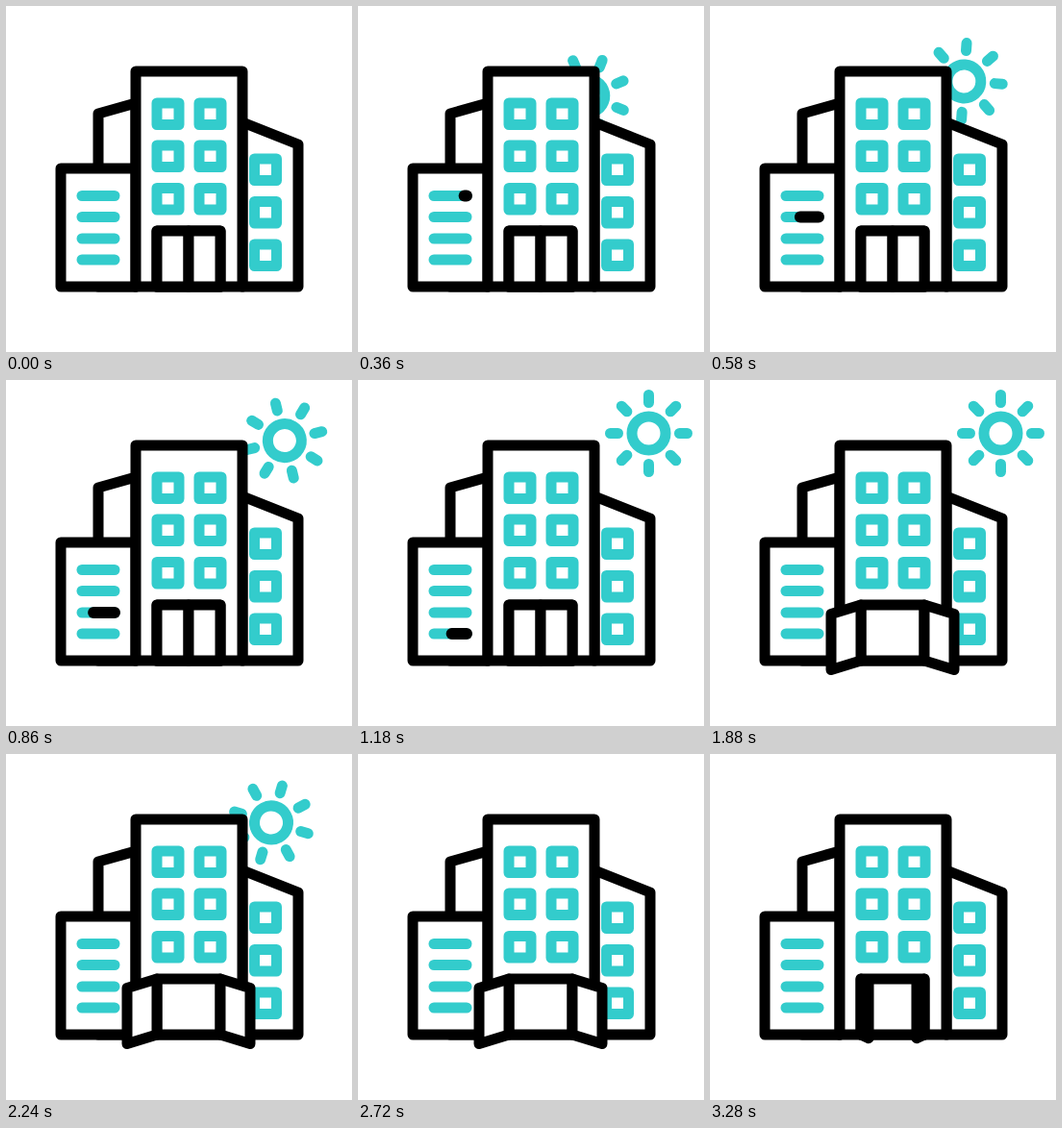
An HTML page that plays this animation: 360x360 px, repeating every 3.3 s.

```html
<!DOCTYPE html>
<html lang="en">
<head>
<meta charset="utf-8">
<title>City building</title>
<style>
  html, body { margin: 0; width: 100%; height: 100%; overflow: hidden; background: #fff; }
  svg { display: block; width: 100vw; height: 100vh; }
  .ink { fill: #fff; stroke: #000; }
  .teal { fill: none; stroke: #3cc; }
  .mark { fill: none; stroke: #000; stroke-width: 12; }
</style>
</head>
<body>
<svg viewBox="0 0 360 360" stroke-width="11" stroke-linecap="round" stroke-linejoin="round">
  <g id="sun" class="teal"><circle r="17.5"/></g>
  <path class="ink" d="M96 292V112L135 101V292Z"/>
  <path class="ink" d="M246 121L304 144V292H246Z"/>
  <g id="side" class="teal"></g>
  <path class="ink" d="M57 169H135V292H57Z"/>
  <g id="lines"></g>
  <path class="ink" d="M135 68H246V292H135Z"/>
  <g id="front" class="teal"></g>
  <path class="ink" d="M157 234H223V292H157Z"/>
  <path id="left" class="ink"/>
  <path id="right" class="ink"/>
</svg>
<script>
const LOOP = 3300;
const $ = id => document.getElementById(id);

function add(parent, tag, attrs) {
  const el = document.createElementNS('http://www.w3.org/2000/svg', tag);
  for (const k in attrs) el.setAttribute(k, attrs[k]);
  return parent.appendChild(el);
}

const pane = (parent, x, y) => add(parent, 'rect', { x, y, width: 23, height: 22.5 });

for (let a = 0; a < 360; a += 45)
  add($('sun'), 'path', { d: 'M0 -32V-40', transform: `rotate(${a})` });

for (const y of [101, 145, 189.5]) {
  pane($('front'), 157, y);
  pane($('front'), 201, y);
}
for (const y of [159, 203.5, 248]) pane($('side'), 258.5, y);

const marks = [197.5, 219.5, 242, 264].map(y => {
  add($('lines'), 'path', { class: 'teal', d: `M79 ${y}H113` });
  return { y, el: add($('lines'), 'path', { class: 'mark' }) };
});

const clamp = v => Math.min(1, Math.max(0, v));
const part = (t, start, length) => clamp((t - start) / length);
const smooth = u => u * u * (3 - 2 * u);

// 0 = high in the sky, 1 = hidden behind the tower
function moveSun(t) {
  const q = t < 1500
    ? Math.pow(1 - part(t, 0, 1100), 1.43)
    : Math.pow(part(t, 2010, 762), 1.2);
  $('sun').setAttribute('transform',
    `translate(${302.5 - 111.5 * q} ${55.5 + 67 * q}) rotate(${-120 * q})`);
}

// A dark stroke grows along each line, then leaves at the right end
function moveMarks(t) {
  marks.forEach(({ y, el }, i) => {
    const u = part(t, 78 + 292 * i, 292);
    const from = 79 + 34 * clamp(2 * u - 1);
    const to = 79 + 34 * clamp(2 * u);
    el.setAttribute('d', to > from ? `M${from} ${y}H${to}` : '');
  });
}

function moveDoors(t) {
  const open = smooth(part(t, 1220, 640)) - smooth(part(t, 2930, 610));
  const dx = 33 - 64 * open;
  const dy = 9.5 * open;
  const leaf = (hinge, x) =>
    `M${hinge} 234L${x} ${234 + dy}V${292 + dy}L${hinge} 292Z`;
  $('left').setAttribute('d', leaf(157, 157 + dx));
  $('right').setAttribute('d', leaf(223, 223 - dx));
}

function draw(now) {
  const t = now % LOOP;
  moveSun(t);
  moveMarks(t);
  moveDoors(t);
}

let begin;
function tick(now) {
  begin ??= now;
  draw(now - begin);
  requestAnimationFrame(tick);
}
draw(0);
requestAnimationFrame(tick);
</script>
</body>
</html>
```
